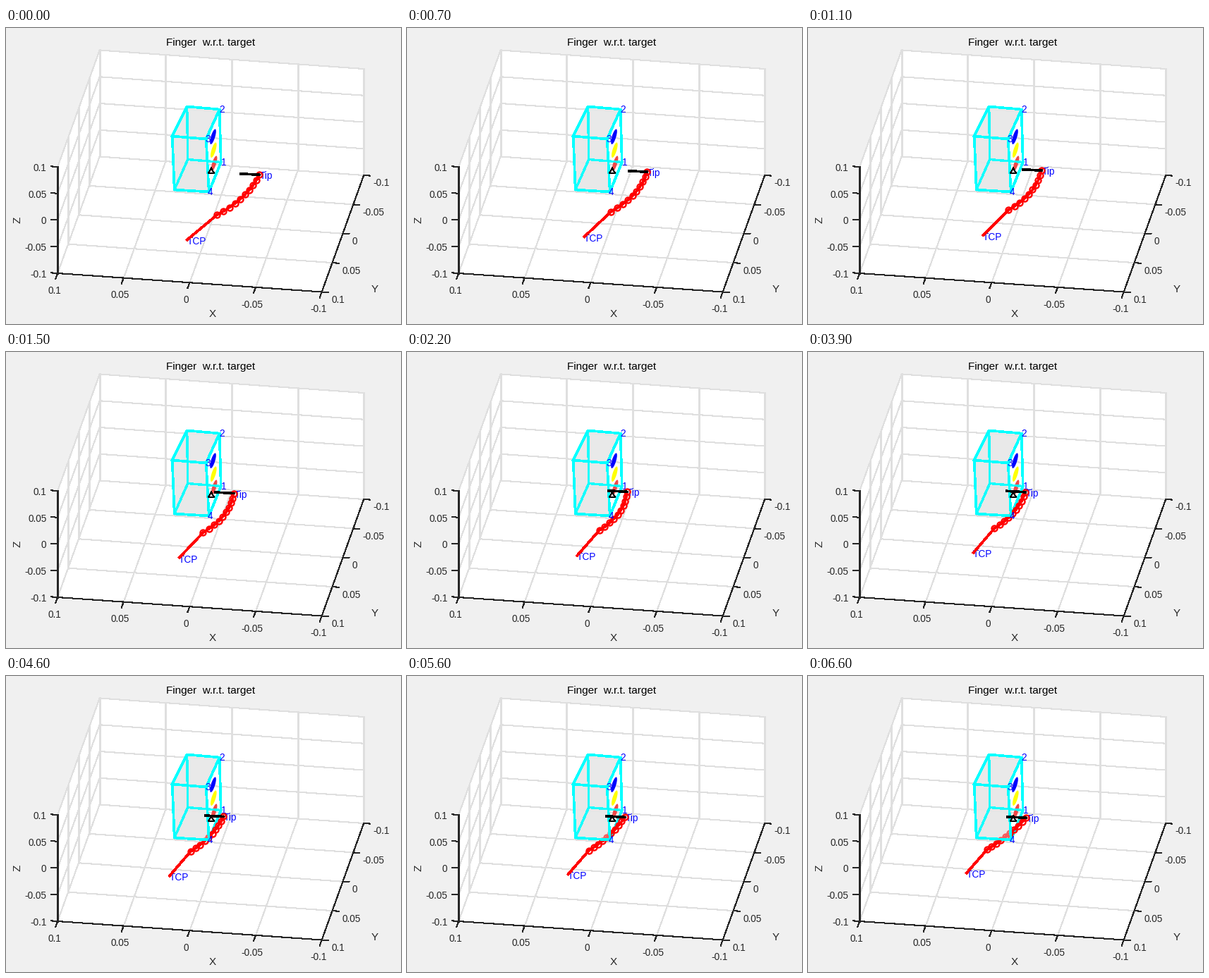
Write a matplotlib script that moves like this. It is 560 px wide and 420 px high and loops after 6700 ms.

```python
import numpy as np
import matplotlib.pyplot as plt
from matplotlib.animation import FuncAnimation
from matplotlib.patches import Ellipse, Polygon

W, H, DPI = 560, 420, 100
PT = 72 / DPI
FRAMES, STEP = 67, 100
INK, BLUE, RED, CYAN = "#262626", "#0000ff", "#ff0000", "#00ffff"
GREY = "#e7e7e7"

plt.rcParams["font.family"] = "Liberation Sans"
plt.rcParams["lines.antialiased"] = False
fig = plt.figure(figsize=(W / DPI, H / DPI), dpi=DPI, facecolor="#f0f0f0")
ax = fig.add_axes([0, 0, 1, 1])
ax.set_xlim(0.3, W + 0.3)
ax.set_ylim(H - 0.5, -0.5)
ax.axis("off")


def line(pts, color, width, z, **kw):
    xs, ys = zip(*pts)
    return ax.plot(xs, ys, color=color, lw=width * PT, zorder=z, **kw)[0]


def face(pts, color, z, alpha=1):
    ax.add_patch(Polygon(pts, fc=color, ec="none", alpha=alpha, zorder=z))


def text(x, y, s, size=13.6, color=INK, ha="center", va="center_baseline", z=5, **kw):
    return ax.text(x, y, s, fontsize=size * PT, color=color, ha=ha, va=va, zorder=z, **kw)


def tag(x, y, s, z):
    return text(x, y, s, color=BLUE, ha="left", va="baseline", z=z)


# Orthographic plot frame: each axis runs -0.1 .. 0.1 over one screen vector.
CORNER = np.array([133, 182])
EX, EY, EZ = np.array([374.5, 26.5]), np.array([-59.5, 165.5]), np.array([0, -151])


def at(x, y, z):
    return CORNER + x * EX + y * EY + z * EZ


for u, v in ((EX, EY), (EX, EZ), (EY, EZ)):
    face([CORNER, CORNER + u, CORNER + u + v, CORNER + v], "white", 0)
    for k in np.linspace(0, 1, 5):
        line([CORNER + k * u, CORNER + k * u + v], "#dfdfdf", 1.05, 1)
        line([CORNER + k * v, CORNER + k * v + u], "#dfdfdf", 1.05, 1)

for a, b in (((0, 1, 0), (1, 1, 0)), ((1, 0, 0), (1, 1, 0)), ((0, 1, 0), (0, 1, 1))):
    line([at(*a), at(*b)], INK, 1.05, 2)

for k in np.linspace(0, 1, 5):
    px, py, pz = at(k, 1, 0), at(1, k, 0), at(0, 1, k)
    down, up = f"{0.1 - 0.2 * k:.3g}", f"{0.2 * k - 0.1:.3g}"
    line([px, px + (-3, 8)], INK, 1.05, 2)
    line([py, py + (9, 0.6)], INK, 1.05, 2)
    line([pz, pz + (-9, -0.6)], INK, 1.05, 2)
    text(px[0] - 4.7, px[1] + 23.3, down)
    text(py[0] + 13.5, py[1] + 10, up, ha="left")
    text(57.8, pz[1] + 0.5, up, ha="right")

text(290.6, 19, "Finger  w.r.t. target", 15.2, "black")
text(293.3, 403.7, "X", 15.2)
text(522.8, 369.3, "Y", 15.2)
text(16.5, 272, "Z", 15.2, va="center", rotation=90)

# Target box: rings ordered back-left, back-right, front-right, front-left.
top = [(257, 111), (303, 115), (284, 157), (236, 153)]
bot = [(258, 186), (305, 190), (288, 232), (239, 229)]
front = [top[3], top[2], bot[2], bot[3]]
face(top[:3] + bot[2:] + top[3:], GREY, 3, 0.9)
for end in (top[0], bot[1], bot[3]):
    line([bot[0], end], CYAN, 2.4, 8.5, alpha=0.9)
line([top[3], top[0], top[1], top[2]], CYAN, 2.67, 4)
line([top[1], bot[1], bot[2]], CYAN, 2.67, 4)
face(front, GREY, 8, 0.4)
line(front + front[:1], CYAN, 2.67, 9)

for k, color in enumerate((BLUE, "#ffff00", "#f04848")):
    ax.add_patch(Ellipse((293.8 + 0.8 * k, 153.7 + 19 * k), 5.8, 22.5, angle=17,
                         fc=color, ec="none", zorder=5))
tri = [(291.3, 198), (287.3, 205.5), (295.3, 205.5)]
line(tri + tri[:1], "black", 1.05, 10)

for s, (x, y), z in zip("1234", (bot[1], top[1], top[2], bot[2]), (5, 10, 10, 9.5)):
    tag(x - (s > "2") * 1.5, y + 5, s, z)

# Finger key points (base, root joint, bend control, tip): the pose at the start
# of the wrapping phase, its drift while wrapping, and its offset on approach.
HOLD = np.array([(249.1, 291.7), (280, 254.7), (320.3, 228.7), (307, 194.8)])
WRAP = np.array([(-24, -12.7), (-26, -8.7), (-36, -1.2), (2.5, 6)])
APPROACH = np.array([(8, 8.3), (19, 10.3), (22.4, 12.8), (52.5, 13)])
CONTACT = 27
t = np.linspace(0, 1, 10)
CURVE = np.stack([(1 - t) ** 2, 2 * t * (1 - t), t ** 2], axis=1)

bone = line([(0, 0), (0, 0)], RED, 2.67, 7)
rings = ax.plot([], [], "o", mfc="none", mec=RED, ms=8 * PT, mew=2.4 * PT, zorder=7)[0]
normal = line([(0, 0), (0, 0)], "black", 2.67, 10)
base_tag = tag(0, 0, "TCP", 6)
tip_tag = tag(0, 0, "Tip", 6)


def draw(i):
    far = max(0, 1 - i / CONTACT) ** 1.5
    pose = HOLD + WRAP * i / (FRAMES - 1) + APPROACH * far
    base, tip = pose[0], pose[-1]
    joints = CURVE @ pose[1:]
    bone.set_data(*np.vstack([base, joints]).T)
    rings.set_data(*joints.T)
    normal.set_data([tip[0] - 26, tip[0]], [tip[1] - 1.5, tip[1]])
    base_tag.set_position(base + (-0.5, 6.8))
    tip_tag.set_position(tip + (0.5, 6))
    return bone, rings, normal, base_tag, tip_tag


anim = FuncAnimation(fig, draw, frames=FRAMES, interval=STEP, repeat=True)
plt.show()
```
